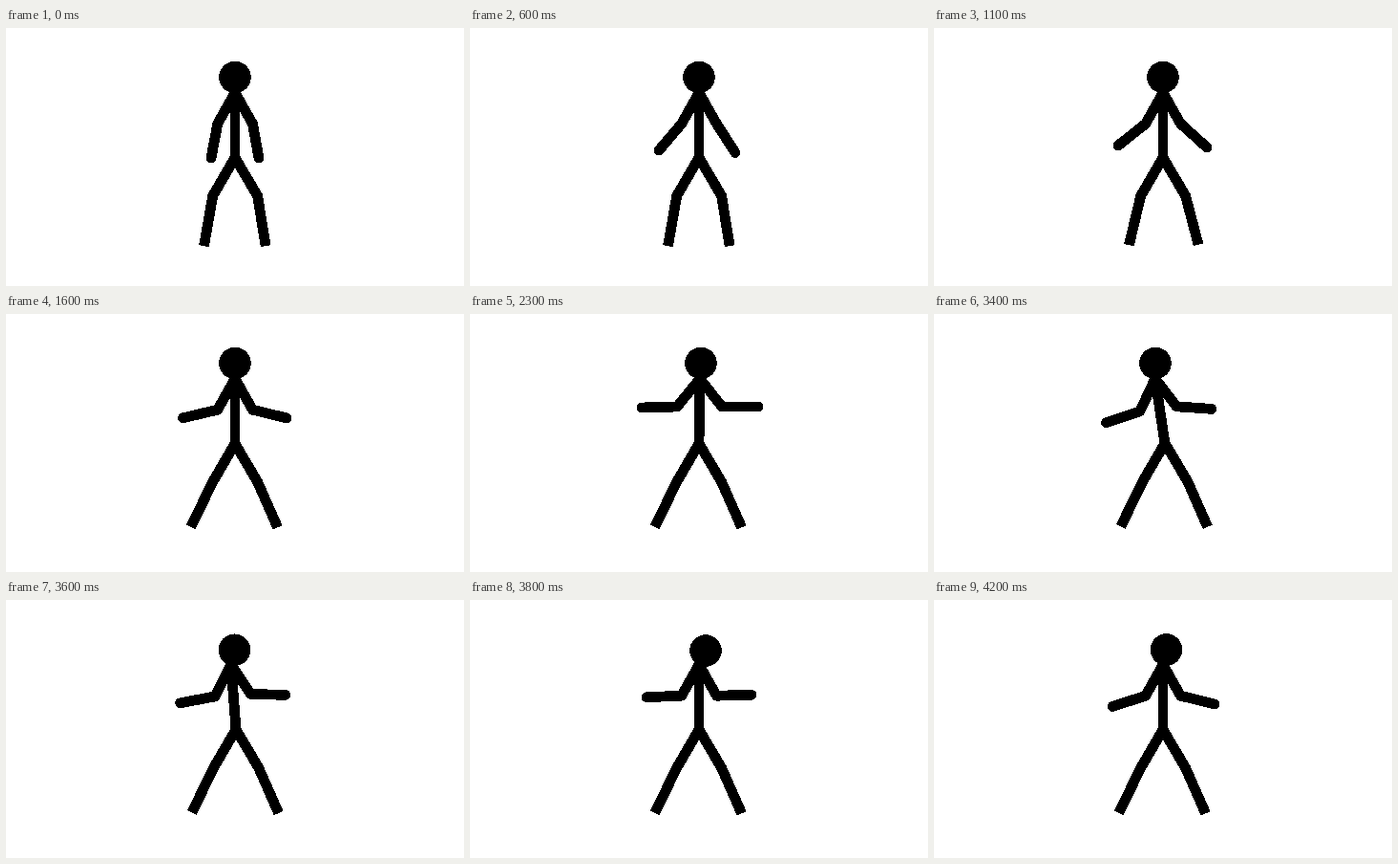
These frames come from a looping animation (480x270 px, 4.3 s). An HTML page:

```html
<!DOCTYPE html>
<html lang="en">
<head>
<meta charset="utf-8">
<title>Stick figure</title>
<style>
  html, body { margin: 0; width: 100%; height: 100%; overflow: hidden; background: #fff; }
  svg { display: block; width: 100%; height: 100%; }
  path { fill: none; stroke: #000; stroke-width: 10.8; stroke-linejoin: round; }
  #arms { stroke-linecap: round; }
</style>
</head>
<body>
<svg viewBox="0 0 480 270" shape-rendering="crispEdges">
  <path id="legs"/>
  <path id="torso"/>
  <path id="arms"/>
  <circle id="head" r="16.8"/>
</svg>
<script>
const LOOP = 4300, TICK = 100;

// Paired joints are listed as left x, left y, right x, right y.
const rest = {
  head: [240, 51.5], neck: [240, 67.7], hip: [240, 135.6],
  elbows: [221.8, 100.2, 258.5, 100.2], hands: [215, 136, 265, 136],
  knees: [216.7, 175.7, 263.6, 175.7], feet: [207.5, 228.2, 272.2, 228.2]
};

// Each move changes some joints; "steps" spreads it over several ticks.
const moves = [
  { at: 200, hands: [212, 135.5, 269, 135] },
  { at: 400, hands: [206, 133, 274, 133] },
  { at: 600, hands: [198, 128, 278, 130.5] },
  { at: 800, hands: [193, 123, 286, 125] },
  { at: 1100, feet: [204.4, 227.2, 277.1, 226.8] },
  { at: 1200, feet: [193.7, 222.8, 284.7, 223.4] },
  { at: 1400, hands: [187, 116, 292, 116] },
  { at: 1600, hands: [185.5, 108.8, 294, 108.9] },
  { at: 2300, head: [242, 51.5], neck: [241, 67.7],
    elbows: [217, 97, 264, 97], hands: [180, 98, 302, 97] },
  { at: 2800, head: [242.5, 52], neck: [240, 67.7],
    elbows: [213, 92.5, 267.5, 92], hands: [176, 90, 305, 89] },
  { at: 3300, steps: 2, head: [232, 51.5], neck: [231.8, 67.7], hip: [242, 135.4],
    elbows: [215.8, 101.8, 254.2, 96.8], hands: [180.5, 113.8, 291, 99.4],
    knees: [218.7, 175.2, 265.8, 175.2], feet: [195.8, 222.3, 286.7, 222.8] },
  { at: 3500, steps: 4, head: [247, 53], neck: rest.neck, hip: rest.hip,
    elbows: rest.elbows, hands: [185, 101.7, 295, 99.3],
    knees: rest.knees, feet: [193.7, 222.8, 284.7, 223.4] },
  { at: 3900, steps: 2, head: [241, 51.5], hands: [187.5, 114, 293.5, 113] },
  { at: 4100, steps: 2, head: [243.5, 52], hands: [187, 111.5, 294, 109] }
];

const mix = (a, b, k) => a.map((v, i) => v + (b[i] - v) * k);

const poses = [{ at: 0, ...rest }];
for (const { at, steps = 1, ...joints } of moves) {
  const from = poses[poses.length - 1];
  for (let i = 1; i <= steps; i++) {
    const pose = { ...from, at: at + (i - 1) * TICK };
    for (const name in joints) pose[name] = mix(from[name], joints[name], i / steps);
    poses.push(pose);
  }
}

const part = id => document.getElementById(id);
const left = p => p.slice(0, 2);
const right = p => p.slice(2);
const line = (id, ...points) => part(id).setAttribute('d', 'M' + points.join('L'));

function draw(p) {
  line('torso', p.neck, p.hip);
  line('arms', left(p.hands), left(p.elbows), p.neck, right(p.elbows), right(p.hands));
  line('legs', left(p.feet), left(p.knees), p.hip, right(p.knees), right(p.feet));
  part('head').setAttribute('cx', p.head[0]);
  part('head').setAttribute('cy', p.head[1]);
}

const start = performance.now();
function tick() {
  const t = (performance.now() - start) % LOOP;
  draw(poses.filter(p => p.at <= t).pop());
  requestAnimationFrame(tick);
}
tick();
</script>
</body>
</html>
```
